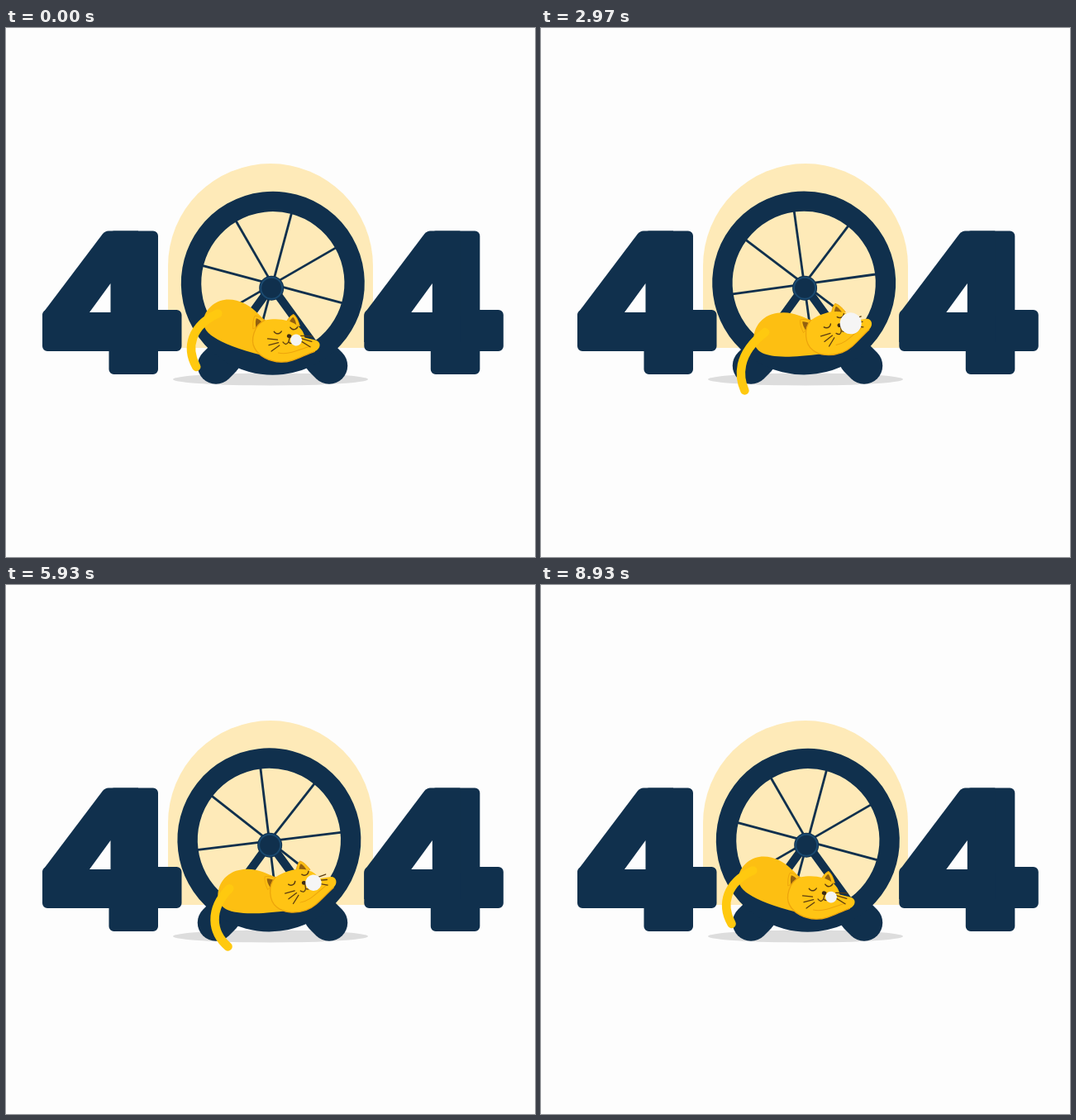
An HTML page with a canvas for the animation above (8.96 s loop, 640 by 640 pixels).

```html
<!DOCTYPE html>
<html lang="en">
<head>
<meta charset="utf-8">
<title>404</title>
<style>
html, body { margin: 0; width: 100%; height: 100%; overflow: hidden; background: #fdfdfd; }
canvas { display: block; width: 640px; height: 640px; }
</style>
</head>
<body>
<canvas id="stage" width="640" height="640"></canvas>
<script>
const ctx = document.getElementById('stage').getContext('2d');
const LOOP = 8960, SWING = 8800, TAU = Math.PI * 2, DEG = Math.PI / 180;
const PAGE = '#fdfdfd', INK = '#10304d', BROWN = '#5b3d12';
const FUR = '#fdbf12', EDGE = '#eda50c';
const PIVOT = { x: 319.8, y: 320 };
const RING_Y = 308.3;

// A cosine whose phase runs unevenly, so it rises and falls at different speeds
const wave = (p, lead, warp, lag) => Math.cos(p + lead + warp * Math.cos(p + lag));

function stroke(color, width, cap = 'round') {
  ctx.strokeStyle = color;
  ctx.lineWidth = width;
  ctx.lineCap = cap;
  ctx.lineJoin = 'round';
  ctx.stroke();
}

function disc(x, y, rx, color, ry = rx) {
  ctx.beginPath();
  ctx.ellipse(x, y, rx, ry, 0, 0, TAU);
  ctx.fillStyle = color;
  ctx.fill();
}

function arc(x, y, r, color, width, from = 0, to = TAU) {
  ctx.beginPath();
  ctx.arc(x, y, r, from, to);
  stroke(color, width);
}

function ray(x, y, angle, length, color, width, cap) {
  ctx.beginPath();
  ctx.moveTo(x, y);
  ctx.lineTo(x + length * Math.cos(angle), y + length * Math.sin(angle));
  stroke(color, width, cap);
}

function shape(d, fill, edge, width = 1) {
  const p = new Path2D(d);
  if (fill) {
    ctx.fillStyle = fill;
    ctx.fill(p);
  }
  if (edge) {
    ctx.strokeStyle = edge;
    ctx.lineWidth = width;
    ctx.lineCap = ctx.lineJoin = 'round';
    ctx.stroke(p);
  }
}

function placed(x, y, angle, draw) {
  ctx.save();
  ctx.translate(x, y);
  ctx.rotate(angle);
  draw();
  ctx.restore();
}

const onWheel = (angle, draw) => placed(PIVOT.x, PIVOT.y, angle, () => {
  ctx.translate(-PIVOT.x, -PIVOT.y);
  draw();
});

// Stem and bar are rounded boxes joined by a slanted block with a hole
function four(x) {
  placed(x, 0, 0, () => {
    ctx.fillStyle = INK;
    ctx.beginPath();
    ctx.roundRect(124.5, 245.5, 59.5, 173.5, 6);
    ctx.roundRect(44, 341, 168.5, 50, 6);
    ctx.fill();
    shape('M124 245.5H160V380H44V349Q44 346 46 343L117 249Q120 245.5 124 245.5Z', INK);
    shape('M126.5 309V344H101Z', PAGE);
  });
}

function backdrop() {
  ctx.fillStyle = PAGE;
  ctx.fillRect(0, 0, 640, 640);
  shape('M196 387V288A124 124 0 0 1 444 288V387Z', '#feeab8');
  disc(320, 425, 118, '#dddddd', 7.5);
  four(0);
  four(389.3);
}

function spokes() {
  for (let i = 0; i < 8; i++) ray(PIVOT.x, RING_Y + 1.5, i * TAU / 8, 89, INK, 2.8, 'butt');
}

function stand(hubX) {
  for (const side of [-1, 1]) {
    const foot = 322.5 + 68.5 * side, lean = (90 - 36 * side) * DEG;
    ray(hubX + 2 * side, 315, lean, 105, INK, 10);
    ray(foot, 408.5, (-90 - 45 * side) * DEG, 12, INK, 44.5);
  }
  disc(hubX, 314.7, 15, INK);
  arc(hubX, 314.7, 13, '#1b4a70', 2);
}

function tail(u) {
  const x = 234 + 9 * u;
  shape(`M265 361C${x} 383 ${x} 411 ${248 + 20 * u} ${431 - 5 * u * u}`, null, '#ffc90f', 10.5);
}

function ear(x, y, angle) {
  placed(x, y, angle, () => {
    shape('M-9 1Q-5 -9 0 -12Q5 -9 9 1Z', FUR, EDGE, .8);
    shape('M-5 1Q-3 -6 0 -8.5Q3 -6 5 1Z', '#93600f');
  });
}

function whiskers(x, y, stepX, angle, turn, length) {
  for (let i = 0; i < 3; i++) {
    ray(x + i * stepX, y + 3 * i, (angle + turn * i) * DEG, length, BROWN, 1.3);
  }
}

function face() {
  for (const [x, y] of [[340, 361], [357.5, 351]]) {
    arc(x, y, 5, BROWN, 1.5, 10 * DEG, 135 * DEG);
  }
  disc(355.5, 365, 2.8, '#3d2b14', 2.4);
  shape('M350 374Q355 378 356.5 372Q361 375 363 370M356.5 372V367', null, BROWN, 1.3);
  whiskers(343, 373, 2, 171, -21, 12);
  whiskers(369, 361, .5, -13, 15, 14);
}

function cat(sway, r) {
  shape('M322 354C310 348 301 340 283 340C262 340 250 356 250 371C251 388 270 396 330 396Z', FUR);
  tail(sway);
  ear(317, 361, -.7);
  ear(355.5, 350, -.15);

  const cheek = 'M322 354C311 363 311 382 319 390C326 398 340 401 354 398C367 395 377 384 390 375';
  shape(cheek + 'C397 370 395 361 387 361.5L374 362C370 350 350 341 322 354Z', '#ffc414');
  shape(cheek, null, EDGE, 1.3);
  shape('M348 388C360 388 370 378 384 370', null, EDGE);
  face();
  disc(360 + .7 * r, 371 - .5 * r, r, '#f5f5f5');
}

function draw(t) {
  const p = TAU * t / LOOP;
  const swing = Math.cos(TAU * Math.min(t, SWING) / SWING);
  const angle = 15 * DEG * swing;
  backdrop();
  onWheel(angle, spokes);
  stand(PIVOT.x + 1.4 * swing);
  onWheel(angle, () => {
    arc(PIVOT.x, RING_Y, 98.8, INK, 24.4);
    cat(wave(p, .85, .36, .7), 9.9 + 3.1 * wave(p, -2.5, .42, -2.5));
  });
}

const start = performance.now();
function tick() {
  draw((performance.now() - start) % LOOP);
  requestAnimationFrame(tick);
}
tick();
</script>
</body>
</html>
```
